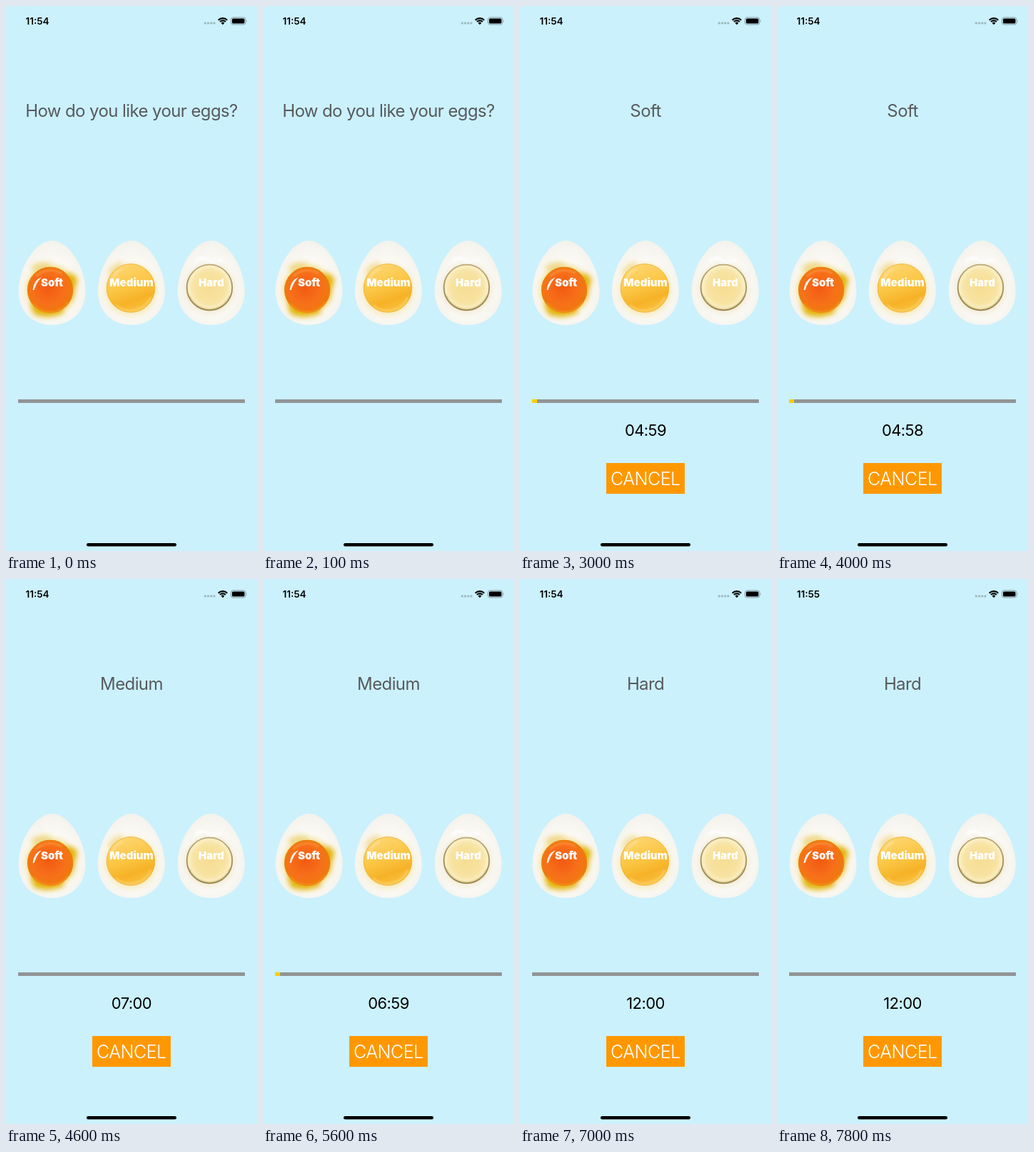
Recreate the animation shown at these times as an HTML page. Size 352x762 px, loop 8 s.

```html
<!DOCTYPE html>
<html lang="en">
<head>
<meta charset="utf-8">
<title>Egg timer</title>
<style>
  html, body { margin: 0; width: 100%; height: 100%; overflow: hidden; background: #cbf1fc; }
  svg { display: block; width: 100vw; height: 100vh; }
  text { font-family: Inter, "Liberation Sans", sans-serif; font-optical-sizing: none; text-anchor: middle; }
  #title { font-size: 24px; letter-spacing: -.6px; fill: #58595e; }
  #time { font-size: 22px; letter-spacing: -.6px; }
  #clock { font-size: 13.5px; font-weight: 600; }
  .cancel { font-size: 25px; font-weight: 300; letter-spacing: -.5px; fill: #fff; }
  .label { font-size: 15px; font-weight: 900; fill: #fff; }
</style>
</head>
<body>
<svg viewBox="0 0 352 762">
  <defs>
    <radialGradient id="white" cx=".5" cy=".56" r=".56">
      <stop offset=".6" stop-color="#fbf9f4"/>
      <stop offset="1" stop-color="#f3f2ec"/>
    </radialGradient>
    <radialGradient id="soft" cx=".46" cy=".45" r=".56">
      <stop offset="0" stop-color="#f25a12"/>
      <stop offset=".65" stop-color="#f7701a"/>
      <stop offset="1" stop-color="#ee7a0c"/>
    </radialGradient>
    <linearGradient id="medium" x1=".3" y1="0" x2=".65" y2="1">
      <stop offset="0" stop-color="#fdd672"/>
      <stop offset=".45" stop-color="#fbc644"/>
      <stop offset=".75" stop-color="#f6b228"/>
      <stop offset="1" stop-color="#fac23e"/>
    </linearGradient>
    <radialGradient id="hard" cx=".5" cy=".5" r=".5">
      <stop offset="0" stop-color="#f6dd93"/>
      <stop offset=".65" stop-color="#f7e2a0"/>
      <stop offset="1" stop-color="#faecbc"/>
    </radialGradient>
    <linearGradient id="rim" x2="0" y2="1">
      <stop offset="0" stop-color="#b9a877"/>
      <stop offset="1" stop-color="#8d7a41"/>
    </linearGradient>
    <filter id="blur" x="-.4" y="-.4" width="1.8" height="1.8"><feGaussianBlur stdDeviation="3.5"/></filter>
    <filter id="haze" x="-.4" y="-.4" width="1.8" height="1.8"><feGaussianBlur stdDeviation="1.2"/></filter>
    <path id="egg" fill="url(#white)" d="M0 328C23 328 47 365 47 399C47 428 26 446 0 446S-47 428 -47 399C-47 365 -23 328 0 328Z"/>
  </defs>

  <rect width="352" height="762" fill="#cbf1fc"/>

  <text id="clock" x="44" y="25.9"></text>
  <g fill="#9db7bf">
    <rect x="277.8" y="22.6" width="3" height="3" rx="1"/>
    <rect x="282" y="22.6" width="3" height="3" rx="1"/>
    <rect x="286.2" y="22.6" width="3" height="3" rx="1"/>
    <rect x="290.4" y="22.6" width="3" height="3" rx="1"/>
  </g>
  <path d="M297.7 19.7A8.9 8.9 0 0 1 310.3 19.7M300 22.1A5.6 5.6 0 0 1 308 22.1" fill="none" stroke="#000" stroke-width="2.1"/>
  <path d="M304 26.2L301.6 23.8A3.4 3.4 0 0 1 306.4 23.8Z"/>
  <rect x="315.5" y="16" width="20.5" height="10" rx="3" fill="none" stroke="#829ba2"/>
  <rect x="317" y="17.5" width="17.5" height="7" rx="1.6"/>
  <path d="M337 19.3Q338.6 21 337 22.7Z" fill="#829ba2"/>

  <text id="title" x="176" y="154.5"></text>

  <use href="#egg" x="64.5"/>
  <g filter="url(#blur)">
    <circle cx="63" cy="397" r="35" fill="#f3dc7a" opacity=".85"/>
    <path d="M34 412Q36 434 46 433Q60 438 82 429L70 400ZM84 372Q104 376 99 388Q93 408 92 414L78 396Z" fill="#e3b50c"/>
    <path d="M34 366Q46 354 64 360L50 380Z" fill="#efd98a"/>
  </g>
  <circle cx="62" cy="397" r="31.5" fill="url(#soft)" stroke="#e8820c" stroke-width="1.4"/>
  <path d="M38 416A31 31 0 0 0 88 414" fill="none" stroke="#fa9c28" stroke-width="2" opacity=".75" filter="url(#haze)"/>
  <path d="M42 378A29 29 0 0 1 78 374" fill="none" stroke="#fb9a45" stroke-width="3" opacity=".6" filter="url(#haze)"/>
  <path d="M37.5 397Q39 383 50 379Q43 386 39.5 397Z" fill="#fff3e4"/>

  <use href="#egg" x="175.8"/>
  <g filter="url(#blur)">
    <circle cx="175" cy="397" r="37" fill="#f6e8b4" opacity=".75"/>
    <path d="M142 374Q146 360 164 357L160 380Z" fill="#f3dfa0"/>
  </g>
  <circle cx="175" cy="394.5" r="33.8" fill="url(#medium)" stroke="#f2b53c"/>
  <path d="M154 418A31 31 0 0 0 203 407" fill="none" stroke="#fdd878" stroke-width="3" opacity=".6" filter="url(#haze)"/>
  <path d="M147 390Q150 373 164 367" fill="none" stroke="#fee09a" stroke-width="3" opacity=".7" filter="url(#haze)"/>

  <use href="#egg" x="287.7"/>
  <circle cx="285.5" cy="395" r="36" fill="#f0e8d0" opacity=".7" filter="url(#blur)"/>
  <path d="M266 357Q274 349 282 355T304 354" fill="none" stroke="#fff" stroke-width="4" opacity=".7" filter="url(#haze)"/>
  <circle cx="285.5" cy="393.5" r="31.8" fill="url(#hard)" stroke="url(#rim)" stroke-width="1.8"/>
  <path d="M257 405A30.7 30.7 0 0 0 314 405" fill="none" stroke="#b29d5c" stroke-width="2" opacity=".7" filter="url(#haze)"/>
  <circle cx="285.5" cy="393" r="28.5" fill="none" stroke="#fcf3d2" stroke-width="2" opacity=".7" filter="url(#haze)"/>

  <text class="label" x="64.5" y="392.4">Soft</text>
  <text class="label" x="176" y="392.4">Medium</text>
  <text class="label" x="288" y="392.4">Hard</text>

  <rect x="17" y="550" width="318" height="5" fill="#919496"/>
  <rect id="bar" x="17" y="550" width="7" height="5" fill="#fc0"/>

  <g id="timer">
    <text id="time" x="176" y="600.6"></text>
    <rect x="121" y="639" width="110" height="43" fill="#ff9800"/>
    <text class="cancel" x="175.8" y="669.7">CANCEL</text>
  </g>

  <rect x="113" y="751" width="126" height="4.4" rx="2.2"/>
</svg>
<script>
const LOOP = 8000, TICK = 1000, CLOCK_TURN = 7800;
// start time, heading, seconds on the timer
const STEPS = [
  [0, "How do you like your eggs?", 0],
  [2000, "Soft", 300],
  [4600, "Medium", 420],
  [7000, "Hard", 720]
];
const el = id => document.getElementById(id);
const setText = (id, value) => {
  const node = el(id);
  if (node.textContent !== value) node.textContent = value;
};
const show = (id, on) => el(id).setAttribute("visibility", on ? "visible" : "hidden");
const pad = n => String(n).padStart(2, "0");
const mmss = s => pad(Math.floor(s / 60)) + ":" + pad(s % 60);

function draw(now) {
  const t = now % LOOP;
  const [start, heading, total] = STEPS.filter(step => step[0] <= t).pop();
  const passed = total ? Math.floor((t - start) / TICK) : 0;
  setText("title", heading);
  setText("time", mmss(total - passed));
  setText("clock", t < CLOCK_TURN ? "11:54" : "11:55");
  show("timer", total > 0);
  show("bar", passed > 0);
}

function loop() {
  draw(performance.now());
  requestAnimationFrame(loop);
}
loop();
</script>
</body>
</html>
```
